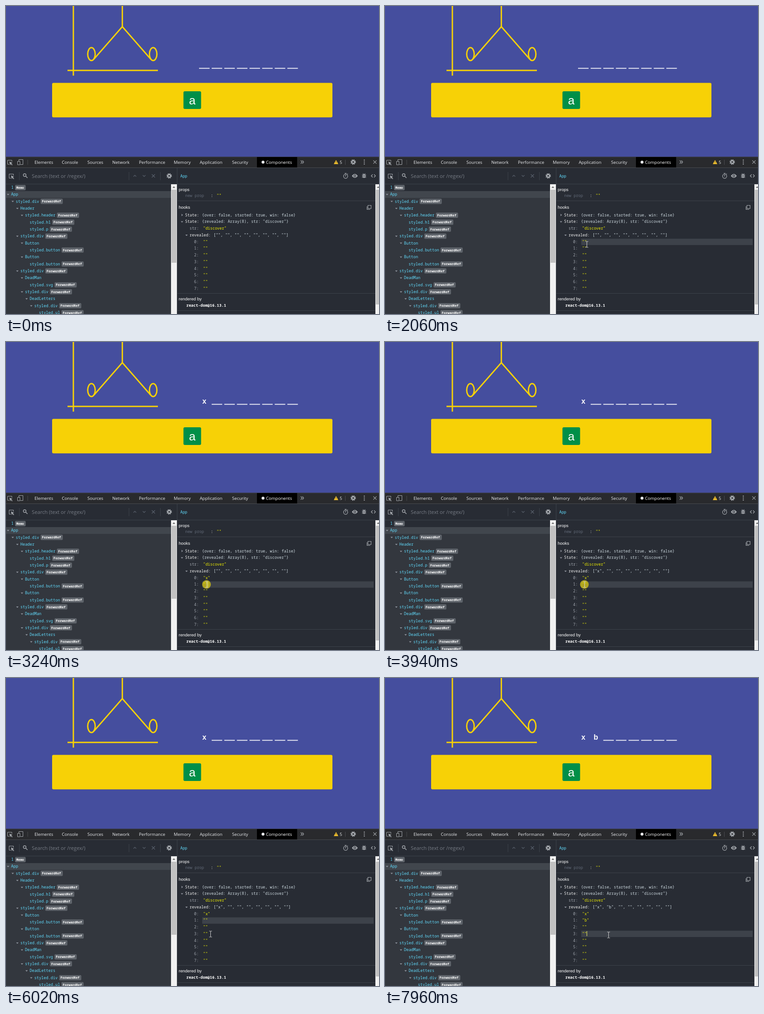
An HTML page for the animation above (8 s loop, 825x679 px).

```html
<!DOCTYPE html>
<html lang="en">
<head>
<meta charset="utf-8">
<title>Hangman component state</title>
<style>
html, body { margin: 0; width: 100%; height: 100%; overflow: hidden; background: #282c34; }
svg { display: block; width: 825px; height: 679px; }
.mono { font: 8.63px "Noto Sans Mono", "DejaVu Sans Mono", monospace; }
.badge { font: bold 7px "Noto Sans Mono", "DejaVu Sans Mono", monospace; }
.tab { font: 9.6px "Open Sans", sans-serif; }
.search { font: 11.2px "Open Sans", sans-serif; }
.head { font: 9.5px "Liberation Sans", sans-serif; }
.big { font: 26px "Liberation Sans", sans-serif; text-anchor: middle; }
.guess { font: bold 16px "Liberation Sans", sans-serif; text-anchor: middle; }
</style>
</head>
<body>
<svg id="stage" viewBox="0 0 825 679" xmlns="http://www.w3.org/2000/svg"></svg>
<script>
const NS = 'http://www.w3.org/2000/svg';
const stage = document.getElementById('stage');
const LOOP = 8000;

function el(tag, attrs, text) {
  const node = document.createElementNS(NS, tag);
  for (const k in attrs) node.setAttribute(k, attrs[k]);
  if (text !== undefined) node.textContent = text;
  return stage.appendChild(node);
}
const rect = (x, y, width, height, fill, rx = 0) => el('rect', { x, y, width, height, fill, rx });
const path = (d, stroke, w = 1, fill = 'none') => el('path', { d, stroke, fill, 'stroke-width': w });
const text = (x, y, cls, fill, str) => el('text', { x, y, class: cls, fill }, str);
const disc = (cx, cy, r, fill) => el('circle', { cx, cy, r, fill });
const ring = (cx, cy, rx, ry, stroke, w) =>
  el('ellipse', { cx, cy, rx, ry, stroke, fill: 'none', 'stroke-width': w });
const show = (node, on) => node.setAttribute('visibility', on ? 'visible' : 'hidden');

const YELLOW = '#f7d106', CYAN = '#61dafb', VALUE = '#f0f000';
const ICON = '#a4a8ad', LINE = '#3d424a', PANEL = '#282c34';

function gear(x, y) {
  el('circle', { cx: x, cy: y, r: 4.9, fill: 'none', stroke: ICON, 'stroke-width': 2, 'stroke-dasharray': '2.2 1.65' });
  el('circle', { cx: x, cy: y, r: 3.1, fill: 'none', stroke: ICON, 'stroke-width': 2.6 });
}
function picker(x, y) {
  path(`M${x + 4.5} ${y - 1}V${y - 4.5}H${x - 5}V${y + 4.5}H${x - 1}`, ICON);
  path(`M${x - 1} ${y - 1.5}l7 3-3 1 3 3-1.2 1.2-3-3-1 3z`, 'none', 0, ICON);
}
const cross = (x, y, r, c) =>
  path(`M${x - r} ${y - r}L${x + r} ${y + r}M${x + r} ${y - r}L${x - r} ${y + r}`, c, 1.2);
const arrowDown = (x, y) => path(`M${x - 2.7} ${y - 1.3}h5.4l-2.7 3z`, 'none', 0, '#8f949d');

// Game area
function drawGame() {
  rect(0, 0, 825, 333, '#454e9e');
  path('M149 0V153.5M136 142H336M257.3 0V45.5', YELLOW, 3);
  path('M194.5 117L257.3 45.5L320 117', YELLOW, 3);
  ring(189, 106, 8.3, 14.3, YELLOW, 3);
  ring(325.5, 106, 8.3, 14.3, YELLOW, 3);
  rect(102, 169.5, 620, 76, YELLOW, 3);
  rect(392.5, 188, 39, 39, '#008f48', 3);
  text(412, 216.5, 'big', '#fff', 'a');
}

// Tab strip and the two toolbars
function drawBars() {
  rect(0, 332.5, 825, 24, '#292a2d');
  rect(0, 332.5, 825, 1, '#3c3d42');
  rect(0, 356, 825, 1, '#484a4f');
  picker(8.5, 344.5);
  path('M28.5 342V338.5H37.5V349.5H32M25.5 342.5H31V350H25.5Z', ICON);
  rect(47.5, 339, 1, 11, '#4a4c50');
  const tabs = [[63, 'Elements'], [123.5, 'Console'], [180, 'Sources'], [235, 'Network'],
    [294, 'Performance'], [371, 'Memory'], [428.5, 'Application'], [500, 'Security']];
  for (const [x, name] of tabs) text(x, 347.8, 'tab', '#e8eaed', name);
  rect(555, 333, 89, 23, '#000');
  disc(568.5, 344.2, 3.2, '#e8eaed');
  text(575, 347.8, 'tab', '#fff', 'Components');
  path('M652 340.5l3 3.5-3 3.5M655.5 340.5l3 3.5-3 3.5', ICON, 1.2);
  path('M730 339.5l5 9h-10z', 'none', 0, '#f5c32c');
  rect(729.5, 342.5, 1, 3, '#333');
  text(738, 347.8, 'tab', '#e8eaed', '5');
  rect(750, 339, 1, 11, '#4a4c50');
  gear(768, 344);
  for (const y of [339.8, 344, 348.2]) disc(792.5, y, 1.2, ICON);
  cross(816, 344, 3.6, ICON);

  rect(0, 357, 825, 35, PANEL);
  picker(12, 375);
  for (const x of [29, 271.5, 341]) rect(x, 366, 1, 18, LINE);
  ring(41.3, 372.8, 3, 3, ICON, 1.4);
  path('M43.5 375l4 4', ICON, 1.6);
  text(57, 378.8, 'search', '#777c85', 'Search (text or /regex/)');
  path('M282 376l3-3 3 3M302.5 373l3 3 3-3', '#5a616d', 1.2);
  cross(326, 374.5, 3.5, '#5a616d');
  gear(361, 374.5);
  text(385.5, 378, 'mono', CYAN, 'App');
  ring(751.2, 375.3, 4.6, 4.6, ICON, 1.3);
  path('M749.2 368.8h4M751.2 372.2v3.6M754.8 371l1.2-1.2', ICON, 1.3);
  path('M765 374.5q6.5-8.6 13 0q-6.5 8.6-13 0z', 'none', 0, ICON);
  disc(771.5, 374.5, 2.7, PANEL);
  disc(771.5, 374.5, 1.6, ICON);
  rect(789.2, 370.5, 5.6, 8.6, ICON, 2.6);
  path('M787.3 372.3h9.4M787.3 375h9.4M787.3 377.7h9.4M789.3 369l1.6 1.8M794.7 369l-1.6 1.8', ICON, 1.1);
  path('M790.8 373.7h2.4M790.8 376.2h2.4', PANEL);
  path('M811 371.3l-3.2 3.2 3.2 3.2M814 371.3l3.2 3.2-3.2 3.2', ICON, 1.3);
}

// Component tree: depth, name, expandable
const tree = [[0, 'App', 1], [1, 'styled.div', 1], [2, 'Header', 1], [3, 'styled.header', 1],
  [4, 'styled.h1', 0], [4, 'styled.p', 0], [2, 'styled.div', 1], [3, 'Button', 1],
  [4, 'styled.button', 0], [3, 'Button', 1], [4, 'styled.button', 0], [2, 'styled.div', 1],
  [3, 'DeadMan', 1], [4, 'styled.svg', 0], [3, 'styled.div', 1], [4, 'DeadLetters', 1],
  [5, 'styled.div', 1], [6, 'styled.ul', 0]];

function badge(x, y, w, str) {
  rect(x, y - 5.7, w, 11.6, '#5f646b', 2);
  text(x + 3, y + 2.6, 'badge', '#fff', str);
}
function drawTree() {
  rect(0, 392, 365, 16, PANEL);
  rect(0, 408, 365, 15, '#41464d');
  rect(0, 423, 365, 256, '#33373e');
  rect(0, 392, 825, 1, LINE);
  text(11.5, 403.2, 'mono', CYAN, '1');
  badge(20, 400.3, 23.5, 'Memo');
  tree.forEach(([depth, name, open], i) => {
    const x = 11.3 + depth * 10.25, y = 415.2 + i * 15.34;
    if (open) arrowDown(x - 6.7, y + .3);
    text(x, y + 3, 'mono', CYAN, name);
    if (name.startsWith('styled')) badge(x + name.length * 5.18 + 3.2, y, 49, 'ForwardRef');
  });
}

function scrollbar(x, w, end) {
  rect(x, 393, w, 286, '#f1f1f1');
  rect(x + 1, 405, w - 2, end - 405, '#c1c1c1');
  path(`M${x + 3.3} 401h6l-3-3.4z`, 'none', 0, '#6a6a6a');
}

const rowY = i => 519.8 + i * 14.68;
let highlight, click, mouse, caret, list;
const cells = [], guesses = [], blanks = [];

function drawInspector() {
  rect(378, 393, 440, 286, PANEL);
  for (const y of [429, 633, 671]) rect(379, y, 438, 1, LINE);
  highlight = rect(434, 0, 379, 14, LINE);
  click = disc(0, 0, 9.6, '#b1a51f');
  text(382, 407.5, 'head', '#fff', 'props');
  text(396.5, 421.3, 'mono', '#626a78', 'new prop');
  text(453, 421.3, 'mono', '#fff', ':');
  text(466, 421.3, 'mono', VALUE, '""');
  text(382, 447, 'head', '#fff', 'hooks');
  path('M800.5 439.5h7v7h-7zM798.5 441.5v7h7', ICON, 1.1);
  path('M388.3 458l3 2.7-3 2.7z', 'none', 0, '#8f949d');
  arrowDown(389.3, 475.7);
  arrowDown(399.3, 505.2);
  const soft = '#cedae0', dim = '#a0a5ad', bright = '#ededed';
  text(396, 463.8, 'mono', bright, 'State:');
  text(433.5, 463.8, 'mono', soft, '{over: false, started: true, win: false}');
  text(396, 478.4, 'mono', bright, 'State:');
  text(433.5, 478.4, 'mono', soft, '{revealed: Array(8), str: "discover"}');
  text(406, 493.3, 'mono', dim, 'str:');
  text(436, 493.3, 'mono', VALUE, '"discover"');
  text(406, 508, 'mono', bright, 'revealed:');
  list = text(459, 508, 'mono', soft, '');
  for (let i = 0; i < 8; i++) {
    text(416, rowY(i) + 3, 'mono', dim, i + ':');
    cells.push(text(436, rowY(i) + 3, 'mono', VALUE, ''));
  }
  text(382, 649, 'head', '#fff', 'rendered by');
  text(399, 663, 'mono', '#fff', 'react-dom@16.13.1').style.fontWeight = 600;
}

function drawAll() {
  rect(0, 0, 825, 679, PANEL);
  drawGame();
  for (let i = 0; i < 8; i++) {
    blanks.push(rect(427 + i * 27.9, 136.5, 23.3, 1.8, '#f4f4fa'));
    guesses.push(text(438.6 + i * 27.9, 136.3, 'guess', '#fff', ''));
  }
  drawBars();
  drawTree();
  drawInspector();
  scrollbar(365, 13, 566);
  scrollbar(817, 13, 658);
  rect(378, 357, 1, 322, LINE);
  caret = rect(0, 0, 1, 11, '#f4f46a');
  mouse = path('M-3 -6.5H-1Q0 -6.5 0 -5.5Q0 -6.5 1 -6.5H3M0 -5.5V5.5M-3 6.5H-1Q0 6.5 0 5.5Q0 6.5 1 6.5H3', '#d4d4d4');
}

// Pointer rests: time, x, y
const rests = [[900, 449.5, 525.5], [980, 448.5, 523.5], [1130, 446.5, 522.5], [1210, 445, 522],
  [1290, 444, 521.5], [1360, 443.5, 521.5], [1760, 446.5, 525.5], [2690, 446.5, 531.5],
  [2920, 446.5, 534.5], [3240, 444, 534.5], [3540, 443.5, 534.5], [3620, 442.5, 534.5],
  [3770, 441.5, 534.5], [4780, 441.5, 537.5], [4940, 441.5, 540.5], [5240, 441.5, 539.5],
  [5320, 440.5, 538.5], [5640, 445.5, 549.5], [5720, 450.5, 560.5], [5790, 452.5, 564.5],
  [6890, 452.5, 566.5], [7040, 452.5, 568.5], [7190, 452.5, 567.5], [7350, 452.5, 566.5],
  [7500, 474.5, 566.5], [7580, 494.5, 566.5]];
// Text caret: from, to, x, row
const carets = [[1530, 2060, 441, 0], [2610, 3070, 446, 0], [3240, 3770, 446, 1], [3940, 4400, 441, 1],
  [4940, 6020, 441, 1], [6570, 6720, 441, 1], [6720, 7190, 446, 1], [7730, 8000, 446, 3]];
// Click flash: time, x, y
const clicks = [[1530, 443.5, 521], [3240, 443.5, 534.5], [3940, 441, 534.5], [5490, 440, 538], [7730, 494.5, 566]];

function pointer(t) {
  if (t < 130) return null;
  if (t < 900) {
    const k = Math.floor((t - 130) / 77) / 10, e = k * k * (3 - 2 * k);
    return [730.5 - 281 * e, 666.5 - 141 * e];
  }
  const at = rests.filter(r => r[0] <= t).pop();
  return [at[1], at[2]];
}

function draw(t) {
  const p = pointer(t);
  show(mouse, p);
  if (p) mouse.setAttribute('transform', `translate(${p[0]} ${p[1]})`);

  const row = t < 1530 ? -1 : t < 3240 ? 0 : t < 7730 ? 1 : 3;
  show(highlight, row >= 0);
  highlight.setAttribute('y', rowY(row) - 6.8);

  const flash = clicks.find(c => t >= c[0] && t < c[0] + 72);
  show(click, flash);
  if (flash) {
    click.setAttribute('cx', flash[1]);
    click.setAttribute('cy', flash[2]);
  }
  const c = carets.find(v => t >= v[0] && t < v[1]);
  show(caret, c);
  if (c) {
    caret.setAttribute('x', c[2]);
    caret.setAttribute('y', Math.round(rowY(c[3]) - 5.8));
  }

  const word = (x, b) => Array.from({ length: 8 }, (_, i) => i === 0 && t >= x ? 'x' : i === 1 && t >= b ? 'b' : '');
  word(2610, 6720).forEach((s, i) => cells[i].textContent = `"${s}"`);
  word(3240, 7730).forEach((s, i) => {
    guesses[i].textContent = s;
    show(blanks[i], !s);
  });
  list.textContent = '[' + word(3940, 7960).map(s => `"${s}"`).join(', ') + ']';
}

drawAll();
const start = performance.now();
function tick() {
  draw((performance.now() - start) % LOOP);
  requestAnimationFrame(tick);
}
tick();
</script>
</body>
</html>
```
